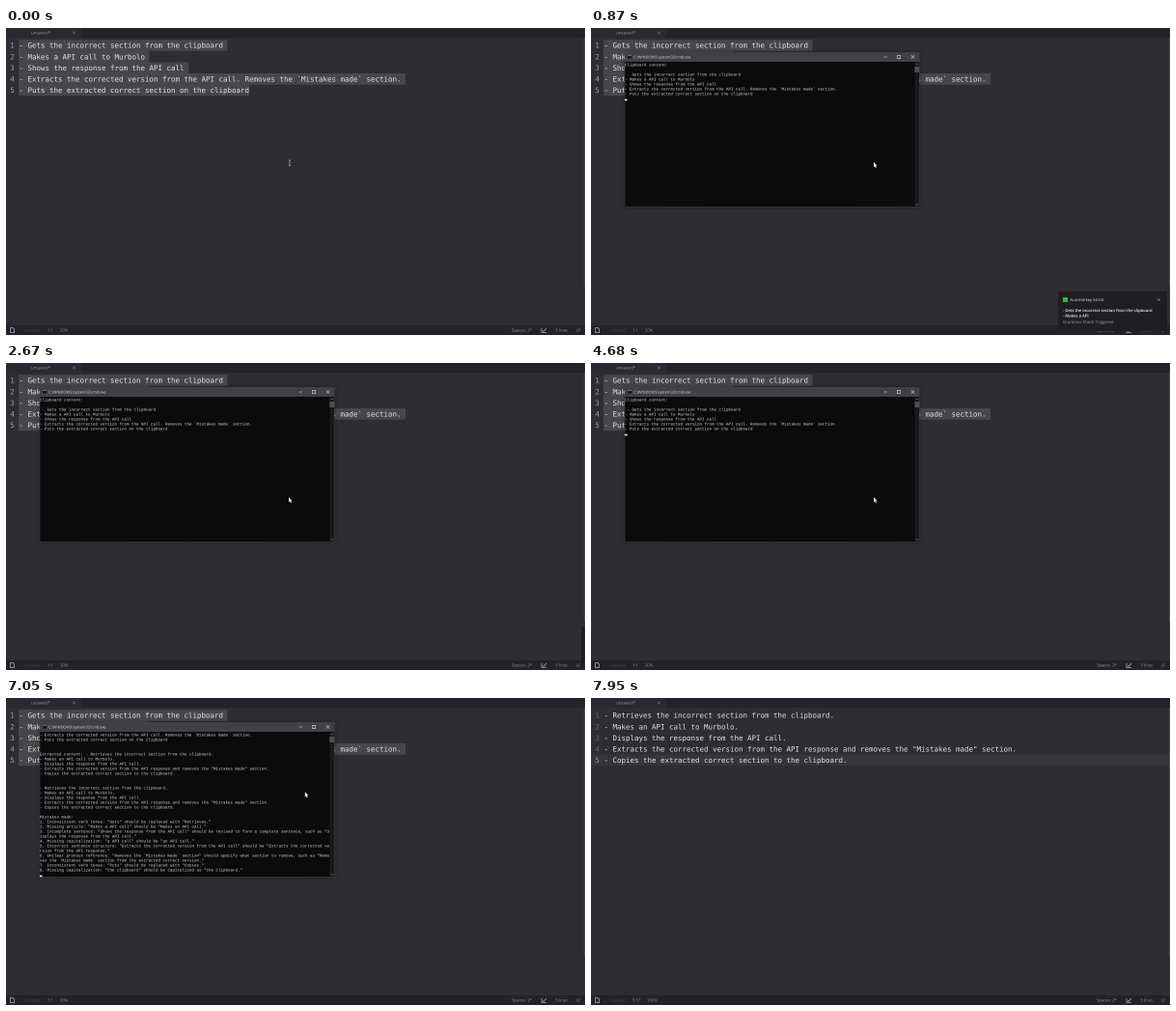
Recreate the animation shown at these times as an HTML page with a canvas. Size 600 by 318 pixels, loop 7980 ms.

```html
<!DOCTYPE html>
<html lang="en">
<head>
<meta charset="utf-8">
<title>Grammar check</title>
<style>
html, body { margin: 0; height: 100%; overflow: hidden; background: #2e2d32; }
canvas { display: block; width: 600px; height: 318px; }
</style>
</head>
<body>
<canvas id="stage" width="1200" height="636"></canvas>
<script>
// Drawn at double size so that the tiny text stays smooth
const ctx = document.getElementById('stage').getContext('2d');
ctx.scale(2, 2);
ctx.textRendering = 'geometricPrecision';

const LOOP = 7980;
const EDITOR = '"DejaVu Sans Mono", monospace';
const CONSOLE = '"Liberation Mono", monospace';
const UI = '"Open Sans", sans-serif';

// Moments in ms
const OPEN = 750, NOTICE_OUT = 2550, REPLY = 5880, MOVE = 6790, CLOSE = 7410, PASTE = 7560;

const before = [
  '- Gets the incorrect section from the clipboard',
  '- Makes a API call to Murbolo',
  '- Shows the response from the API call',
  '- Extracts the corrected version from the API call. Removes the `Mistakes made` section.',
  '- Puts the extracted correct section on the clipboard'
];
const after = [
  '- Retrieves the incorrect section from the clipboard.',
  '- Makes an API call to Murbolo.',
  '- Displays the response from the API call.',
  '- Extracts the corrected version from the API response and removes the "Mistakes made" section.',
  '- Copies the extracted correct section to the clipboard.'
];
const mistakes = [
  'Mistakes made:',
  '1. Inconsistent verb tense: "Gets" should be replaced with "Retrieves."',
  '2. Missing article: "Makes a API call" should be "Makes an API call."',
  '3. Incomplete sentence: "Shows the response from the API call" should be revised to form a complete sentence, such as "Displays the response from the API call."',
  '4. Missing capitalization: "a API call" should be "an API call."',
  '5. Incorrect sentence structure: "Extracts the corrected version from the API call" should be "Extracts the corrected version from the API response."',
  '6. Unclear pronoun reference: "Removes the `Mistakes made` section" should specify what section to remove, such as "Removes the `Mistakes made` section from the extracted correct version."',
  '7. Inconsistent verb tense: "Puts" should be replaced with "Copies."',
  '8. Missing capitalization: "the clipboard" should be capitalized as "the Clipboard."'
];
const prompt = ['Clipboard content:', '', ' ' + before[0], ...before.slice(1)];
const wrap = line => line.match(/.{1,120}/g) || [''];
const reply = [
  ...prompt, '', '', 'Extracted content: ' + after[0], ...after.slice(1),
  '', '', ...after, '', ...mistakes
].flatMap(wrap).slice(-29);

const clamp = v => Math.min(1, Math.max(0, v));
const progress = (t, start, length) => clamp((t - start) / length);
const smooth = u => u * u * (3 - 2 * u);

function rect(x, y, w, h, color) {
  ctx.fillStyle = color;
  ctx.fillRect(x, y, w, h);
}

// Laid out large and scaled evenly, so small sizes keep exact spacing
function text(str, x, y, size, color, family, weight = 400) {
  ctx.save();
  ctx.translate(x, y);
  ctx.scale(size / 100, size / 100);
  ctx.font = `${weight} 100px ${family}`;
  ctx.fillStyle = color;
  ctx.fillText(str, 0, 0);
  ctx.restore();
}

function line(color, width, ...points) {
  ctx.strokeStyle = color;
  ctx.lineWidth = width;
  ctx.beginPath();
  points.forEach(([x, y]) => ctx.lineTo(x, y));
  ctx.stroke();
}

function cross(x, y, r, color) {
  line(color, 0.6, [x - r, y - r], [x + r, y + r]);
  line(color, 0.6, [x - r, y + r], [x + r, y - r]);
}

function drawCaret(x, y, sinceFull) {
  ctx.globalAlpha = clamp(0.5 + 0.9 * Math.cos(2 * Math.PI * sinceFull / 430));
  rect(x, y, 1, 11.2, '#f4f3f5');
  ctx.globalAlpha = 1;
}

function drawEditor(t) {
  const pasted = t >= PASTE;
  const lines = pasted ? after : before;
  const pitch = 11.6, left = 13.5, char = 4.5;
  rect(0, 0, 600, 318, '#2e2d32');
  if (pasted) rect(0, 58.4, 600, pitch, '#36353a');

  lines.forEach((str, i) => {
    const top = 12.2 + i * pitch;
    if (!pasted) rect(13, top, (str.length + (i < 4 ? 1 : 0)) * char + 0.5, pitch, '#47464b');
    const bright = !pasted || i === 4;
    text(i + 1, 4.2, top + 8.5, 7.47, bright ? '#a3a1a5' : '#68666b', EDITOR);
    text(str, left, top + 8.5, 7.475, '#e4e3e5', EDITOR);
  });

  if (pasted) drawCaret(left + lines[4].length * char, 58.8, t - 7735);
  else if (t < OPEN || t > CLOSE) drawCaret(13, 12.4, t - 645);

  // Tab bar and scrollbar
  rect(0, 0, 600, 10, '#252229');
  rect(0, 0, 78, 10, '#2b292f');
  text('unsaved*', 26, 6.6, 4.5, '#9b989e', UI);
  cross(70.5, 5, 1.3, '#77747a');
  rect(598.8, 10, 1.2, 258, '#444247');

  // Status bar
  rect(0, 308, 600, 10, '#242128');
  line('#b5b2b8', 0.7, [4.5, 310.5], [7, 310.5], [8.5, 312], [8.5, 315.5], [4.5, 315.5], [4.5, 310.5]);
  text('unsaved', 19, 314.7, 4.2, '#4e4b52', UI);
  text(pasted ? '5:57' : '1:1', 43, 314.7, 4.2, '#9a979d', UI);
  text(pasted ? '100%' : '20%', pasted ? 58 : 56, 314.7, 4.2, '#9a979d', UI);
  text('Spaces: 2*', 524, 314.7, 4.3, '#9a979d', UI);
  line('#a5a2a8', 0.8, [555, 311], [555, 315.5], [560, 315.5]);
  line('#a5a2a8', 0.8, [556, 313.5], [557.2, 314.3], [560, 311]);
  text('5 lines', 569.5, 314.7, 4.2, '#9a979d', UI);
  text('LF', 591, 314.7, 4.2, '#9a979d', UI);
}

function drawConsole(t) {
  const alpha = progress(t, OPEN, 60) * (1 - progress(t, CLOSE, 60));
  if (!alpha) return;
  ctx.save();
  ctx.globalAlpha = alpha;
  ctx.shadowColor = 'rgba(0,0,0,.3)';
  ctx.shadowBlur = 8;
  rect(35, 25, 305.5, 160.5, '#0b0b0c');
  ctx.shadowColor = 'transparent';

  rect(35, 25, 305.5, 10, '#424045');
  rect(38, 28, 4, 3.6, '#17171a');
  line('#c8c8c8', 0.5, [38, 28.2], [42, 28.2]);
  text('C:\\WINDOWS\\system32\\cmd.exe', 44, 31.6, 3.9, '#e2e1e3', UI);
  line('#d5d4d6', 0.6, [303.5, 30], [307, 30]);
  line('#d5d4d6', 0.6, [317.3, 28.3], [320.7, 28.3], [320.7, 31.7], [317.3, 31.7], [317.3, 28]);
  cross(333.5, 30, 1.7, '#d5d4d6');

  rect(335.3, 35, 5.2, 150.5, '#19191b');
  rect(335.3, 40, 5.2, 6, '#4d4c4f');
  line('#77767a', 0.6, [336.6, 38.2], [337.9, 37], [339.2, 38.2]);
  line('#77767a', 0.6, [336.6, 182.3], [337.9, 183.5], [339.2, 182.3]);
  line('#434246', 0.5, [35, 35], [35, 185.4], [340.4, 185.4], [340.4, 35]);

  if (t >= OPEN + 60) {
    const rows = t < REPLY ? prompt : reply;
    rows.forEach((str, i) => text(str, 35, 39.3 + i * 5, 4.166, '#dedede', CONSOLE));
    const blink = Math.floor((t - 1170) / 159.5);
    if (blink % 2 === 0) rect(35, 38.6 + (t < REPLY ? 7 : 29) * 5, 2.5, 1.7, '#f0f0f0');
  }
  ctx.restore();
}

function drawNotice(t) {
  const enter = 1 - (1 - progress(t, OPEN, 110)) ** 3;
  const leave = progress(t, NOTICE_OUT, 123) ** 2;
  const shift = 116 * (1 - enter + leave);
  if (shift >= 116) return;
  ctx.save();
  ctx.translate(shift, 0);
  rect(484, 273, 113, 41, '#1f1e21');
  rect(489, 279, 5, 5, '#3fae49');
  text('AutoHotkey 64-bit', 496.5, 283.1, 4.15, '#dddcde', UI);
  cross(588.5, 281.5, 1.2, '#929194');
  text(before[0], 489, 294, 4.17, '#f4f4f4', UI, 600);
  text('- Makes a API', 489, 299.7, 4.17, '#f4f4f4', UI, 600);
  text('Grammar Check Triggered', 489, 305.8, 4.3, '#a5a4a7', UI);
  ctx.restore();
}

function drawMouse(t) {
  if (t >= PASTE) return;
  const u = smooth(progress(t, MOVE, 620));
  const x = 293 + 44 * u, y = 139 - 109 * u;
  if (t < OPEN || t > CLOSE + 60) {
    line('#c4c3c6', 0.7, [x + 1, y - 2], [x + 1, y + 3.5]);
    line('#c4c3c6', 0.6, [x, y - 2], [x + 2, y - 2]);
    line('#c4c3c6', 0.6, [x, y + 3.5], [x + 2, y + 3.5]);
    return;
  }
  ctx.save();
  ctx.translate(x, y);
  ctx.fillStyle = '#fff';
  ctx.fill(new Path2D('M0 0V5L1.1 4.1L2 6L2.8 5.6L2 3.7H3.5Z'));
  ctx.restore();
}

function draw() {
  const t = performance.now() % LOOP;
  drawEditor(t);
  drawConsole(t);
  drawNotice(t);
  drawMouse(t);
  requestAnimationFrame(draw);
}
draw();
</script>
</body>
</html>
```
